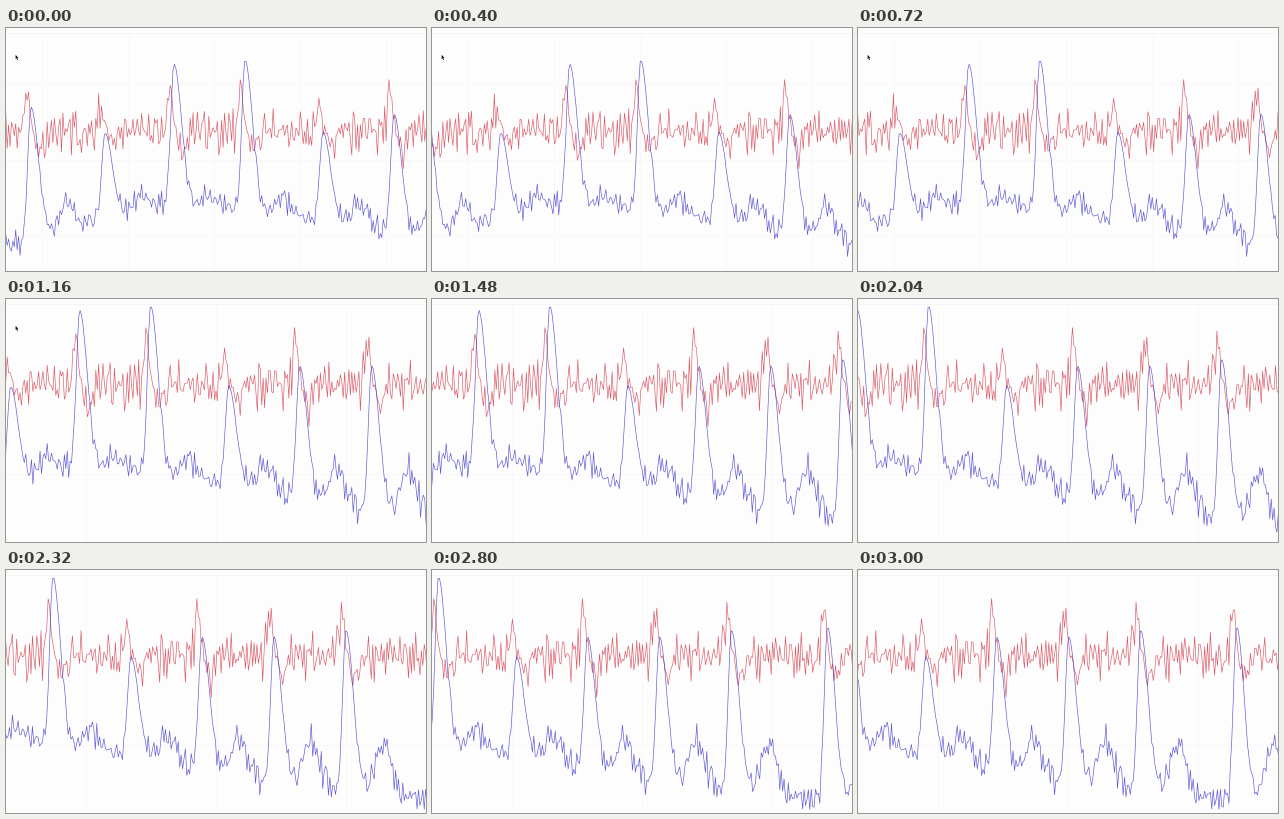
These frames come from a looping animation (420x243 px, 3040 ms). A matplotlib script:

```python
import matplotlib.pyplot as plt
import numpy as np
from matplotlib.animation import FuncAnimation
from matplotlib.patches import Polygon

W, H, DPI = 420, 243, 100
PX = 72 / DPI
FRAMES, INTERVAL = 76, 40
SPEED = 3.37              # pixels scrolled per frame
HOLD_AT = 7               # the scroll pauses for one frame
ZOOM_AT = 24              # the vertical range and grid switch
CURSOR_END = 36
STEP = 1.43               # pixels between samples

# position and blue top of each beat
BEATS = [(25, 79), (99, 105), (168, 36), (239, 32), (317, 104),
         (388, 86), (460, 86), (532, 80), (628, 77)]


def bump(x, center, width):
    return np.exp(-((x - center) / width) ** 2)


def alternating_noise(rng, n):
    w = rng.normal(0, 1, n + 1)
    return np.clip((w[1:] - 0.5 * w[:-1]) / 1.12, -2.1, 2.1)


def make_traces():
    rng = np.random.default_rng(12)
    x = np.arange(-6, 690, STEP)
    level = np.interp(x, [0, 158, 300, 447, 620], [218, 174, 189, 215, 233])
    red = np.full_like(x, 103.0)
    hump, pulse = np.zeros_like(x), np.zeros_like(x)
    top = np.zeros_like(x)
    for pos, height in BEATS:
        d = x - pos
        beat = np.where(d < 0, bump(d, 0, 4.6), bump(d, 0, 10.5))
        top = np.where(beat > pulse, height, top)
        pulse = np.maximum(pulse, beat)
        hump += bump(d, 37, 11)
        strength = min(1, (130 - height) / 45)
        red += strength * (21 * bump(d, 9, 5) - 43 * bump(d, -4, 3.5))
    blue = level + 0.75 * (165 - level) * hump
    blue += (top - blue) * pulse
    blue += 7 * alternating_noise(rng, x.size) * (1 - pulse) ** 2
    red += 11.5 * alternating_noise(rng, x.size) * (1 - 0.6 * pulse)
    return x, red, blue


def scroll(i):
    return SPEED * (i - (i >= HOLD_AT))


def zoom(y):
    return 9 + 1.11 * (y - 34)


x, red, blue = make_traces()

fig = plt.figure(figsize=(W / DPI, H / DPI), dpi=DPI, facecolor="#fdfdfd")
ax = fig.add_axes([0, 0, 1, 1])
ax.set_xlim(0, W)
ax.set_ylim(H, 0)
ax.axis("off")


def make_grid(xs, ys, color="#f8f8f9"):
    style = dict(color=color, lw=PX, zorder=1)
    return ([ax.axvline(v + 0.5, ymax=1 - 5 / H, **style) for v in xs]
            + [ax.axhline(v + 0.5, **style) for v in ys])


make_grid([], [5], "#f4f4f4")
wide_grid = make_grid(range(35, W, 86), range(56, H, 75))
close_grid = make_grid(range(79, W, 130), range(89, H, 85))

trace = dict(lw=0.62 * PX, alpha=0.8)
red_line, = ax.plot([], [], color="#d42a3c", zorder=2, **trace)
blue_line, = ax.plot([], [], color="#2f28cc", zorder=3, **trace)

arrow = [(9.6, 26.8), (9.6, 31), (10.5, 30.4), (11.3, 32.2),
         (12, 31.8), (11.2, 30.1), (12.4, 29.9)]
cursor = ax.add_patch(Polygon(arrow, fc="#111111", ec="none", zorder=4))


def update(i):
    close = i >= ZOOM_AT
    for line in wide_grid:
        line.set_visible(not close)
    for line in close_grid:
        line.set_visible(close)
    for line, y in ((red_line, red), (blue_line, blue)):
        line.set_data(x - scroll(i), zoom(y) if close else y)
    cursor.set_visible(i < CURSOR_END)
    return red_line, blue_line, cursor


anim = FuncAnimation(fig, update, frames=FRAMES, interval=INTERVAL,
                     repeat=True, repeat_delay=0)
plt.show()
```
